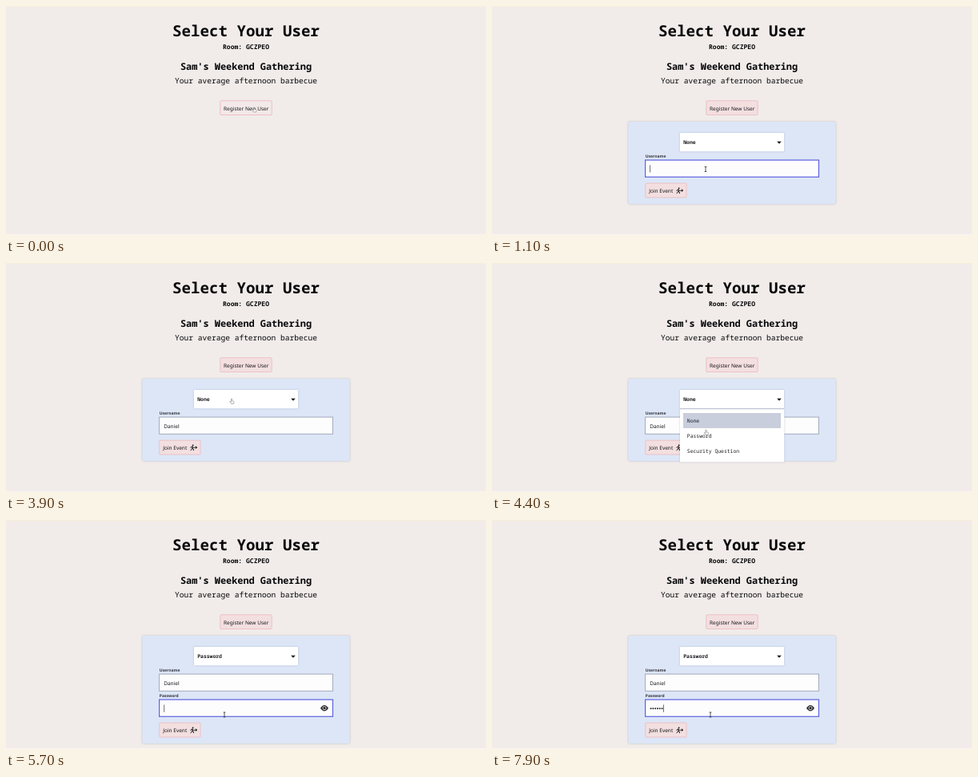
Write an HTML page that moves like this. It is 600 by 287 pixels and loops after 8 s.

```html
<!DOCTYPE html>
<html lang="en">
<head>
<meta charset="utf-8">
<title>Select Your User</title>
<style>
  html, body { margin: 0; width: 100%; height: 100%; overflow: hidden; background: #f1ecea; }
  svg { display: block; width: 100vw; height: 100vh; }
  text {
    font-family: "Noto Sans", "Open Sans", sans-serif; font-size: 6.5px; fill: #17171b;
    white-space: pre; text-rendering: geometricPrecision;
  }
  .mono { font-family: "Noto Sans Mono", "DejaVu Sans Mono", monospace; fill: #060608; }
  .mid { text-anchor: middle; }
  .bold { font-weight: 700; }
  .title { font-size: 19.15px; }
  .room { font-size: 8.05px; }
  .event { font-size: 11.9px; }
  .about { font-size: 9.57px; }
  .pick { font-size: 6.42px; fill: #1c1c22; }
  .chosen { font-weight: 600; }
  .label { font-size: 5px; font-weight: 600; fill: #33333a; }
  .button { fill: #f3dfe0; stroke: #edc1c5; }
  .button.hover { fill: #f3e9e8; stroke: #f0bec2; }
  .panel { fill: #dce6f7; filter: drop-shadow(0 .8px 1.1px rgba(60, 60, 80, .28)); }
  .box { fill: #fff; filter: drop-shadow(0 .8px .9px rgba(50, 60, 90, .25)); }
  .input { fill: #fdfdfe; stroke: #9ba3b4; stroke-width: .9; }
  .input.focus { stroke: #5f62de; stroke-width: 1.2; }
  .caret { stroke: #33333a; stroke-width: .7; }
  .icon { fill: none; stroke: #111; stroke-width: 1; stroke-linecap: round; stroke-linejoin: round; }
  .cursor { fill: #fbf8f8; stroke: #77777d; stroke-width: .55; stroke-linejoin: round; }
</style>
</head>
<body>
<svg viewBox="0 0 600 287" preserveAspectRatio="none">
  <rect width="600" height="287" fill="#f1ecea"/>
  <rect width="600" height="1" fill="#f7efd8"/>
  <rect y="286" width="600" height="1" fill="#f8f5f3"/>

  <text class="mono mid bold title" x="300" y="38.2">Select Your User</text>
  <text class="mono mid bold room" x="300" y="54.2">Room: GCZPEO</text>
  <text class="mono mid bold event" x="300" y="79.9">Sam's Weekend Gathering</text>
  <text class="mono mid about" x="300" y="97.4">Your average afternoon barbecue</text>

  <rect id="register" class="button" x="267.8" y="118.8" width="64.4" height="17.7" rx="1"/>
  <text class="mid" x="300.2" y="130.6">Register New User</text>

  <g id="form">
    <rect id="panel" class="panel" x="170.3" y="145" width="259.4" height="103.2" rx="2"/>
    <rect class="box" x="235" y="159" width="130" height="23.3" rx="1"/>
    <text id="choice" class="mono chosen pick" x="239.2" y="173.2"></text>
    <path d="M356.2 169.8h5.6l-2.8 3z" fill="#111"/>

    <text class="label" x="191.8" y="190.2">Username</text>
    <rect id="nameBox" class="input" x="191.6" y="193.1" width="216.9" height="21.2"/>
    <text id="name" x="197.2" y="206.5"></text>
    <path id="nameCaret" class="caret" d="M0 199.4v9.2"/>

    <g id="secret">
      <text class="label" x="191.8" y="222.2">Password</text>
      <rect id="passBox" class="input" x="191.6" y="225.1" width="216.9" height="21.2"/>
      <g id="dots" fill="#222"></g>
      <path id="passCaret" class="caret" d="M0 231.5v9.3"/>
      <path d="M393 235.7q5-7.6 10 0q-5 7.6-10 0z" fill="#27272c"/>
      <circle cx="398" cy="235.7" r="2.1" fill="#27272c" stroke="#fff" stroke-width=".8"/>
    </g>

    <g id="join">
      <rect class="button" x="191.8" y="222.2" width="51.2" height="17.8" rx="1"/>
      <text x="196.2" y="233.7">Join Event</text>
      <circle cx="233.6" cy="228.5" r=".9" fill="#111"/>
      <path class="icon" d="M230.8 231.4l.8-1 1.6-.2 1.1 1.2.9.2M233.2 230.4l-.3 1.8 1.2.8.3 1.7M232.7 232.4l-.6 1.2-1.2 1M236 231.2h2.4m-1.2-1.2l1.4 1.2-1.4 1.2"/>
    </g>

    <g id="menu">
      <rect class="box" x="235" y="183" width="130.3" height="66.5"/>
      <path d="M235 182.8h130" stroke="#b9bfcb" stroke-width=".8"/>
      <rect x="239" y="188" width="122" height="19" fill="#c9cedc"/>
      <text class="mono pick" x="243.8" y="200">None</text>
      <text class="mono pick" x="243.8" y="219">Password</text>
      <text class="mono pick" x="243.8" y="238.2">Security Question</text>
    </g>
  </g>

  <g id="mouse">
    <path id="hand" class="cursor" d="M-.6 .4q.6-.9 1.2 0v2.4l2 .5q.7.3.5 1.1l-.6 2h-3l-1.8-2.5q.3-.9 1.1-.3l.6.5z"/>
    <path id="arrow" class="cursor" d="M0 0v6.6l1.6-1.4 1 2.3 1-.4-1-2.3h2.1z"/>
    <path id="beam" d="M-1.3-3H1.3M0-3V3M-1.3 3H1.3" fill="none" stroke="#222" stroke-width=".75"/>
  </g>
</svg>

<script>
const LOOP = 8000, STEP = 100;
const USER = "Daniel";
const NAME_KEYS = [1800, 2000, 2200, 2400, 2600, 2800];
const PASS_KEYS = [7100, 7400, 7500, 7600, 7700, 7800];
const DOT_GAP = 2.8;

// time, x, y of the pointer's hot spot
const PATH = [
  [0, 310, 126.6], [100, 310, 126.6], [200, 310, 129.6], [900, 267, 204.5],
  [3300, 267, 204.5], [3800, 282, 170], [4000, 282, 170],
  [4400, 267.5, 209], [4700, 268, 213], [5200, 273, 244]
];

const $ = id => document.getElementById(id);
const show = (id, on) => $(id).style.display = on ? "" : "none";
const during = (t, from, to) => t >= from && t < to;
const typed = (keys, t) => keys.filter(k => k <= t).length;
const smooth = p => p * p * (3 - 2 * p);

for (let i = 0; i < PASS_KEYS.length; i++) {
  const dot = document.createElementNS("http://www.w3.org/2000/svg", "circle");
  dot.setAttribute("cx", 198.6 + i * DOT_GAP);
  dot.setAttribute("cy", 236.3);
  dot.setAttribute("r", 1);
  $("dots").append(dot);
}

function pointerAt(t) {
  const next = PATH.findIndex(k => k[0] > t);
  if (next < 0) return PATH[PATH.length - 1].slice(1);
  const [t0, x0, y0] = PATH[next - 1], [t1, x1, y1] = PATH[next];
  const p = smooth((t - t0) / (t1 - t0));
  return [x0 + (x1 - x0) * p, y0 + (y1 - y0) * p];
}

function pointerKind(y, menuOpen, hasPass) {
  if (y < 137 || (y >= 159 && y < 183) || menuOpen) return "hand";
  if ((y >= 193 && y < 215) || (hasPass && y >= 225 && y < 247)) return "beam";
  return "arrow";
}

function setCaret(id, x, on) {
  $(id).setAttribute("transform", `translate(${x})`);
  show(id, on);
}

function draw(t) {
  const menuOpen = during(t, 4000, 4700), hasPass = t >= 4700;
  const nameFocus = during(t, 1100, 3600), passFocus = t >= 5300;
  const [x, y] = pointerAt(t);

  show("form", t >= 200);
  show("menu", menuOpen);
  show("secret", hasPass);
  $("panel").setAttribute("height", hasPass ? 135.2 : 103.2);
  $("join").setAttribute("transform", `translate(0 ${hasPass ? 32 : 0})`);
  $("choice").textContent = hasPass ? "Password" : "None";
  $("register").classList.toggle("hover", y < 137);
  $("nameBox").classList.toggle("focus", nameFocus);
  $("passBox").classList.toggle("focus", passFocus);

  const name = $("name");
  name.textContent = USER.slice(0, typed(NAME_KEYS, t));
  const nameWidth = name.textContent ? name.getComputedTextLength() : 0;
  setCaret("nameCaret", 197.6 + nameWidth, nameFocus && t < 3300);

  const count = typed(PASS_KEYS, t);
  [...$("dots").children].forEach((dot, i) => dot.style.display = i < count ? "" : "none");
  const blinkOn = t >= 7100 || Math.floor((t - 5300) / 500) % 2 === 0;
  setCaret("passCaret", 197.7 + count * DOT_GAP, passFocus && blinkOn);

  const kind = pointerKind(y, menuOpen, hasPass);
  for (const id of ["hand", "arrow", "beam"]) show(id, id === kind);
  $("mouse").setAttribute("transform", `translate(${x} ${y})`);
}

const start = performance.now();
function tick() {
  const t = Math.max(0, performance.now() - start) % LOOP;
  draw(Math.floor(t / STEP) * STEP);
  requestAnimationFrame(tick);
}
tick();
</script>
</body>
</html>
```
